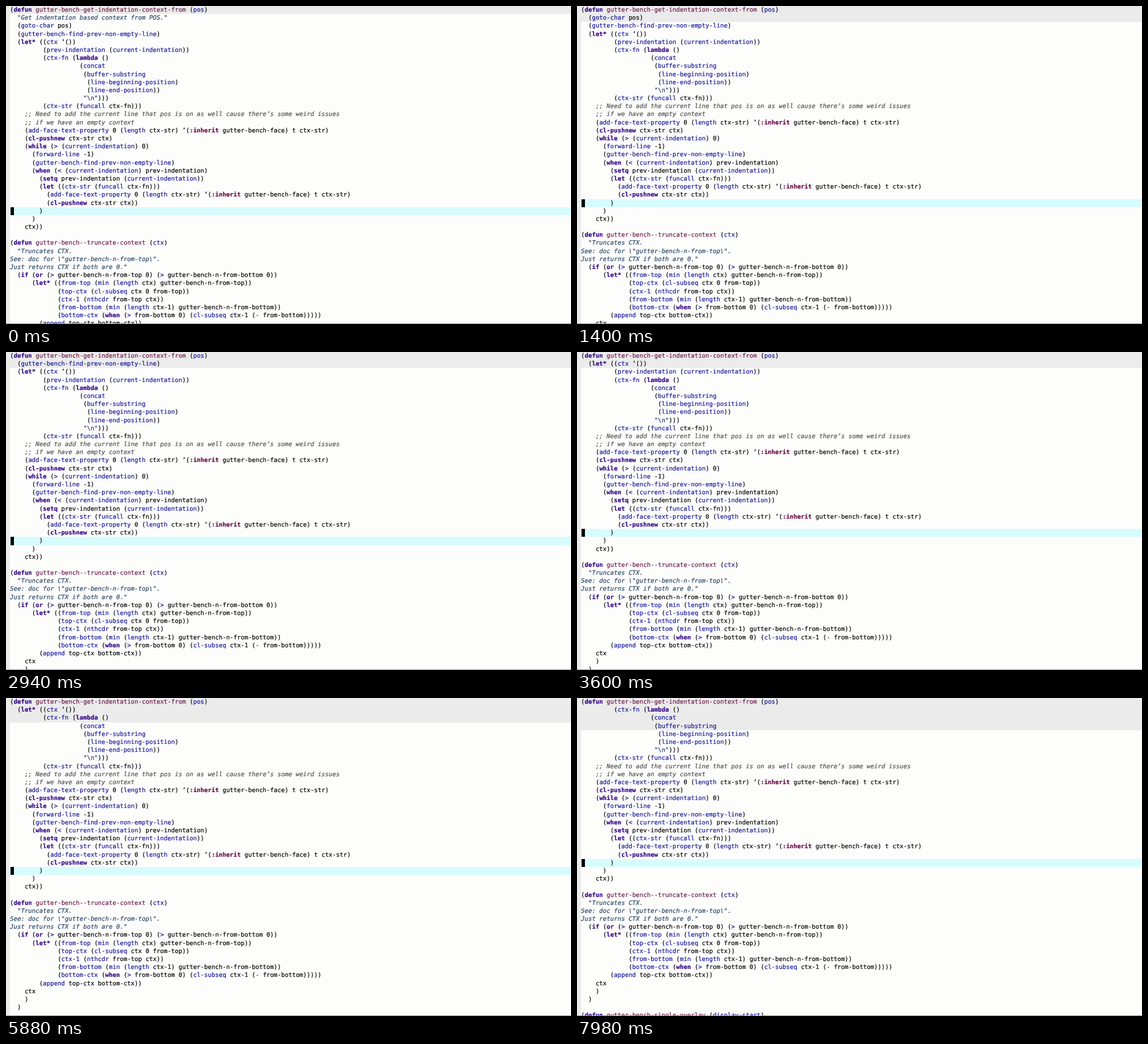
An HTML page for the animation above (8000 ms loop, 998 px wide and 561 px high).

```html
<!DOCTYPE html>
<html lang="en">
<head>
<meta charset="utf-8">
<title>Sticky code context</title>
<style>
  html, body { margin: 0; width: 100%; height: 100%; overflow: hidden; }
  body { position: relative; background: #fdfdfc; color: #000; }
  #fringe { position: absolute; left: 0; top: 0; width: 7px; height: 100%; background: #ebebeb; }
  #edge { position: absolute; left: 0; bottom: 0; width: 100%; height: 1px; background: #8c8c8c; }
  #rows {
    position: absolute; left: 7px; right: 0; top: 0;
    font: 10.765px/14.2px "DejaVu Sans Mono", monospace;
    -webkit-text-stroke: 0.2px;
    text-rendering: geometricPrecision; white-space: pre;
  }
  #rows div { height: 14.2px; position: relative; }
  #rows .head { background: #ebebeb; }
  #rows .point { background: #d7fcfd; }
  .point::before { content: ""; position: absolute; left: 0.5px; top: 0; width: 6.5px; height: 100%; background: #000; }
  .key { color: #360888; font-weight: bold; }
  .prop { color: #6c0848; font-weight: bold; }
  .name { color: #6c1a4a; }
  .call { color: #16169a; }
  .str { color: #24396a; }
  .doc { color: #2a4464; font-style: italic; }
  .note { color: #505050; font-style: italic; }
</style>
</head>
<body>
<div id="rows"></div>
<div id="fringe"></div>
<div id="edge"></div>
<script>
const code = String.raw`(defun gutter-bench-get-indentation-context-from (pos)
  "Get indentation based context from POS."
  (goto-char pos)
  (gutter-bench-find-prev-non-empty-line)
  (let* ((ctx '())
         (prev-indentation (current-indentation))
         (ctx-fn (lambda ()
                   (concat
                    (buffer-substring
                     (line-beginning-position)
                     (line-end-position))
                    "\n")))
         (ctx-str (funcall ctx-fn)))
    ;; Need to add the current line that pos is on as well cause there’s some weird issues
    ;; if we have an empty context
    (add-face-text-property 0 (length ctx-str) ’(:inherit gutter-bench-face) t ctx-str)
    (cl-pushnew ctx-str ctx)
    (while (> (current-indentation) 0)
      (forward-line -1)
      (gutter-bench-find-prev-non-empty-line)
      (when (< (current-indentation) prev-indentation)
        (setq prev-indentation (current-indentation))
        (let ((ctx-str (funcall ctx-fn)))
          (add-face-text-property 0 (length ctx-str) ’(:inherit gutter-bench-face) t ctx-str)
          (cl-pushnew ctx-str ctx))
        )
      )
    ctx))

(defun gutter-bench--truncate-context (ctx)
  "Truncates CTX.
See: doc for \"gutter-bench-n-from-top\".
Just returns CTX if both are 0."
  (if (or (> gutter-bench-n-from-top 0) (> gutter-bench-n-from-bottom 0))
      (let* ((from-top (min (length ctx) gutter-bench-n-from-top))
             (top-ctx (cl-subseq ctx 0 from-top))
             (ctx-1 (nthcdr from-top ctx))
             (from-bottom (min (length ctx-1) gutter-bench-n-from-bottom))
             (bottom-ctx (when (> from-bottom 0) (cl-subseq ctx-1 (- from-bottom)))))
        (append top-ctx bottom-ctx))
    ctx
    )
  )

(defun gutter-bench-single-overlay (display-start)`.replace("'()", "’()").split("\n");

const POINT = 25, ROWS = 40, LOOP = 8000;
const scrollTimes = [700, 1140, 2500, 3380, 5000, 5760, 6800, 7600];
const keywords = /^(defun|let\*?|lambda|while|when|setq|if|or|cl-pushnew)$/;

const span = (cls, text) => `<span class="${cls}">${text}</span>`;
const indent = line => line.search(/\S/);

function colorSymbols(text) {
  return text.replace(/\(([^\s()]+)/g, (all, word) => {
    const cls = keywords.test(word) ? "key" : word[0] === ":" ? "prop" : "call";
    return "(" + span(cls, word);
  });
}

let inDoc = false;
const painted = code.map(line => {
  const text = line.replace(/</g, "&lt;");
  if (/^\s*"[A-Z]/.test(line)) inDoc = true;
  if (inDoc) {
    inDoc = !line.endsWith('"');
    return span("doc", text);
  }
  if (/^\s*;/.test(line)) return span("note", text);
  if (/^\s*"/.test(line)) return text.replace(/".*"/, s => span("str", s));
  const def = text.match(/^(\(defun )(\S+)(.*)/);
  if (def) return colorSymbols(def[1]) + span("name", def[2]) + colorSymbols(def[3]);
  return colorSymbols(text);
});

// Enclosing lines by indentation, cut to the first one and the last three.
function contextOf(start) {
  const ctx = [start];
  for (let i = start - 1; i >= 0; i--) {
    if (indent(code[i]) < indent(code[ctx[0]])) ctx.unshift(i);
  }
  return ctx.length > 4 ? [ctx[0], ...ctx.slice(-3)] : ctx;
}

const rows = document.getElementById("rows");
let shown = -1;

function show(start) {
  if (start === shown) return;
  shown = start;
  const head = contextOf(start);
  const body = code.map((_, i) => i).slice(start + 1);
  rows.innerHTML = [...head, ...body].slice(0, ROWS).map((n, row) => {
    const cls = row < head.length ? "head" : n === POINT ? "point" : "";
    return `<div class="${cls}">${painted[n]}</div>`;
  }).join("");
}

function tick(now) {
  const t = now % LOOP;
  show(scrollTimes.filter(at => at <= t).length);
  requestAnimationFrame(tick);
}
show(0);
requestAnimationFrame(tick);
</script>
</body>
</html>
```
